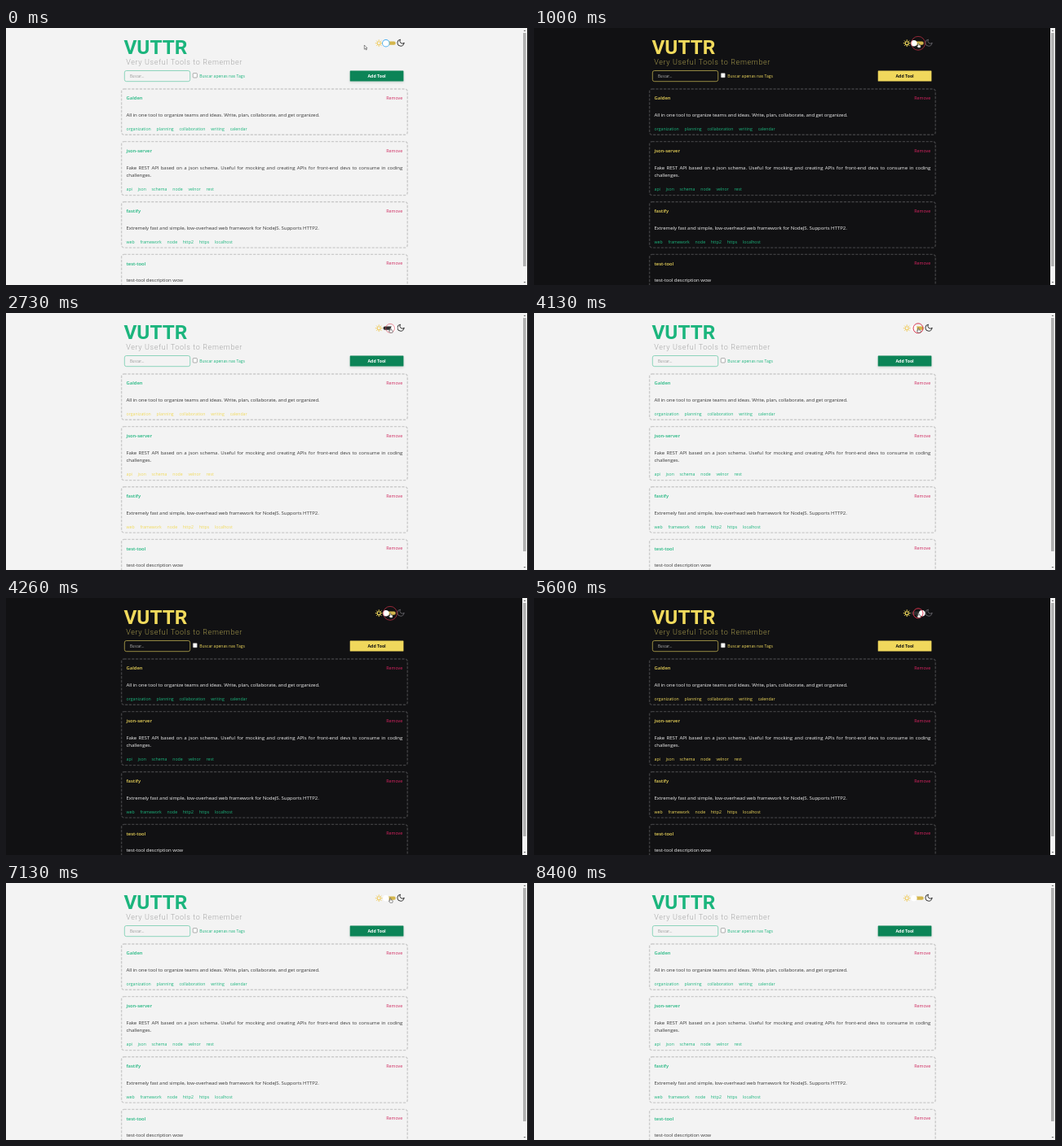
An HTML page with a canvas for the animation above (8530 ms loop, 640 by 316 pixels).

```html
<!DOCTYPE html>
<html lang="en">
<head>
<meta charset="utf-8">
<title>VUTTR</title>
<style>
html, body { margin: 0; width: 100%; height: 100%; overflow: hidden; background: #f3f3f3; }
canvas { display: block; width: 640px; height: 316px; }
</style>
</head>
<body>
<canvas id="stage"></canvas>
<script>
const LOOP = 8530;
const SANS = '"Open Sans", "Noto Sans", sans-serif';
const ROBOTO = 'Roboto, sans-serif';
const GREEN = [27, 181, 125], YELLOW = [241, 218, 92];
const TRACK_OFF = [212, 182, 76], TRACK_ON = [46, 46, 46];
const BODY = { size: 6.1, spacing: -0.09 };
const TAG = { size: 5.2, gap: 6.8 };

const THEMES = {
  light: {
    bg: '#f3f3f3', accent: '#1bb57d', sub: '#a6a6a6', text: '#3a3a3a', border: '#cbcbcb',
    remove: '#cf2a60', input: '#74cdae', hint: '#979797', button: '#0c8457',
    buttonText: '#fff', sun: '#f0cf6c', moon: '#222'
  },
  dark: {
    bg: '#111113', accent: '#f1da5c', sub: '#a3974b', text: '#f0f0f0', border: '#3e3e40',
    remove: '#dc2463', input: '#b8a94f', hint: '#b4b4b4', button: '#f0d85c',
    buttonText: '#111', sun: '#f1da5c', moon: '#66656a'
  }
};

const CARDS = [
  { y: 75, h: 56.3, name: 'Galden',
    lines: ['All in one tool to organize teams and ideas. Write, plan, collaborate, and get organized.'],
    tags: ['organization', 'planning', 'collaboration', 'writing', 'calendar'] },
  { y: 139.6, h: 66, name: 'json-server',
    lines: ['Fake REST API based on a json schema. Useful for mocking and creating APIs for front-end devs to consume in coding', 'challenges.'],
    tags: ['api', 'json', 'schema', 'node', 'velnor', 'rest'] },
  { y: 213.8, h: 56.3, name: 'fastify',
    lines: ['Extremely fast and simple, low-overhead web framework for NodeJS. Supports HTTP2.'],
    tags: ['web', 'framework', 'node', 'http2', 'https', 'localhost'] },
  { y: 278.4, h: 56.3, name: 'test-tool', lines: ['test-tool description wow'], tags: [] }
];

// Each click flips the theme on release; r and a shape the shrinking ring.
const CLICKS = [
  { press: 800, release: 1000, r: 8.5, a: 0.65 },
  { press: 2530, release: 2730, r: 5.5, a: 0.55 },
  { press: 4130, release: 4260, r: 8.5, a: 0.65 },
  { press: 5600, release: 5800, r: 9, a: 0.9 }
];

const canvas = document.getElementById('stage');
const ctx = canvas.getContext('2d');
const ratio = window.devicePixelRatio || 1;
canvas.width = 640 * ratio;
canvas.height = 316 * ratio;

const clamp = v => Math.max(0, Math.min(1, v));
const lerp = (a, b, k) => a + (b - a) * k;
const ease = k => k * k * (3 - 2 * k);
const mix = (a, b, k) => `rgb(${a.map((v, i) => Math.round(lerp(v, b[i], k)))})`;

// Small type is laid out ten times larger, then scaled, to keep fractional advances.
function setFont({ size, weight = 400, family = SANS, spacing = 0 }) {
  ctx.font = `${weight} ${size * 10}px ${family}`;
  ctx.letterSpacing = `${spacing * 10}px`;
}

function text(str, x, y, color, style) {
  ctx.save();
  ctx.translate(x, y);
  ctx.scale(0.1, 0.1);
  setFont(style);
  ctx.textAlign = style.align || 'left';
  ctx.fillStyle = color;
  ctx.fillText(str, 0, 0);
  ctx.restore();
}

function textWidth(str, style) {
  ctx.save();
  setFont(style);
  const w = ctx.measureText(str).width / 10;
  ctx.restore();
  return w;
}

function justified(str, x, y, width, color, style) {
  const words = str.split(' ');
  const widths = words.map(w => textWidth(w, style));
  const gap = (width - widths.reduce((a, b) => a + b, 0)) / (words.length - 1);
  words.forEach((w, i) => {
    text(w, x, y, color, style);
    x += widths[i] + gap;
  });
}

function box(x, y, w, h, r) {
  ctx.beginPath();
  ctx.roundRect(x, y, w, h, r);
}

function disc(x, y, r) {
  ctx.beginPath();
  ctx.arc(x, y, r, 0, Math.PI * 2);
}

function stroke(color, width) {
  ctx.strokeStyle = color;
  ctx.lineWidth = width;
  ctx.stroke();
}

function fill(color) {
  ctx.fillStyle = color;
  ctx.fill();
}

function drawHeader(c) {
  text('VUTTR', 144.4, 32.2, c.accent, { size: 24.4, weight: 700, family: ROBOTO });
  text('Very Useful Tools to Remember', 147.3, 44.6, c.sub,
    { size: 9, weight: 300, family: ROBOTO, spacing: 0.63 });

  box(145.3, 52.5, 80.4, 13.2, 2.4);
  stroke(c.input, 0.8);
  text('Buscar...', 152, 61, c.hint, { size: 4.4 });

  box(229.2, 55.6, 5.1, 5.4, 0.8);
  fill('#fff');
  stroke('#777', 0.6);
  text('Buscar apenas nas Tags', 237.2, 61.2, c.accent, { size: 5.05 });

  ctx.save();
  if (c === THEMES.light) {
    ctx.shadowColor = 'rgba(0,60,40,.16)';
    ctx.shadowBlur = 3;
    ctx.shadowOffsetY = 1.5;
  }
  box(421.7, 52.5, 65.7, 13, 0.6);
  fill(c.button);
  ctx.restore();
  text('Add Tool', 454.6, 61, c.buttonText, { size: 5.2, weight: 700, align: 'center' });
}

function drawCard(card, c, tagColor) {
  const { y, h, name, lines, tags } = card;
  ctx.save();
  ctx.setLineDash([3.2, 1.6]);
  box(141.6, y, 350.6, h, 3);
  stroke(c.border, 1.4);
  ctx.restore();

  text(name, 147.5, y + 13.1, c.accent, { size: 5.85, weight: 600 });
  text('Remove', 486.2, y + 13, c.remove, { size: 5.3, align: 'right' });
  lines.forEach((line, i) => {
    const base = y + 33.9 + i * 9.7;
    if (i < lines.length - 1) justified(line, 147.5, base, 338.7, c.text, BODY);
    else text(line, 147.5, base, c.text, BODY);
  });

  let x = 147.5;
  const tagY = y + 50.8 + (lines.length - 1) * 9.7;
  for (const tag of tags) {
    text(tag, x, tagY, tagColor, TAG);
    x += textWidth(tag, TAG) + TAG.gap;
  }
}

const moon = new Path2D('M21 12.8A9 9 0 1 1 11.2 3 7 7 0 0 0 21 12.8z');

function drawIcons(c) {
  ctx.save();
  ctx.lineCap = 'round';
  disc(457.2, 18.7, 2);
  stroke(c.sun, 1.1);
  ctx.beginPath();
  for (let i = 0; i < 8; i++) {
    const a = i * Math.PI / 4;
    ctx.moveTo(457.2 + 3 * Math.cos(a), 18.7 + 3 * Math.sin(a));
    ctx.lineTo(457.2 + 4 * Math.cos(a), 18.7 + 4 * Math.sin(a));
  }
  stroke(c.sun, 1);

  ctx.translate(478.5, 12.8);
  ctx.scale(0.45, 0.45);
  ctx.lineJoin = 'round';
  ctx.strokeStyle = c.moon;
  ctx.lineWidth = 2;
  ctx.stroke(moon);
  ctx.restore();
}

function drawToggle(on, focused) {
  box(462.5, 16.6, 15.2, 4.1, 2);
  fill(mix(TRACK_OFF, TRACK_ON, on));
  const x = lerp(465.8, 475.8, on);
  if (focused) {
    disc(x, 18.7, 4.7);
    fill('#4aaef0');
  }
  disc(x, 18.7, 3.8);
  fill('#fff');
}

function drawRing(t) {
  for (const { press, release, r, a } of CLICKS) {
    const k = (t - release) / 130;
    if (t < press || k >= 1) continue;
    const held = t < release;
    const radius = held ? (t < press + 65 ? 6 : 11.3) : r * (1 - k);
    ctx.save();
    ctx.globalAlpha = held ? 1 : a * (1 - k);
    disc(471, 18.8, radius);
    stroke('#d8344c', 1);
    ctx.restore();
  }
}

const arrow = new Path2D('M0 0V5.2L1.3 4.1 2.2 6 3 5.6 2.1 3.8H3.7Z');
const hand = new Path2D('M-.6 .2Q0 -.6 .6 .2V2.2L2.4 2.7Q3 2.9 2.9 3.6L2.5 5.6H-.5L-2 3.6Q-1.7 2.8-1.2 3.1L-.6 3.6Z');

function drawCursor(t) {
  if (t >= 8400) return;
  const k = ease(clamp((t - 30) / 500));
  const x = lerp(439.3, 471.3, k), y = lerp(21, 18.6, k);
  const shape = x > 461 ? hand : arrow;
  ctx.save();
  ctx.translate(x, y);
  ctx.lineJoin = 'round';
  ctx.strokeStyle = '#222';
  ctx.lineWidth = 0.5;
  ctx.fillStyle = '#fff';
  ctx.fill(shape);
  ctx.stroke(shape);
  ctx.restore();
}

function triangle(x, y, dy) {
  ctx.beginPath();
  ctx.moveTo(x - 1.4, y);
  ctx.lineTo(x + 1.4, y);
  ctx.lineTo(x, y + dy);
  fill('#606060');
}

function drawScrollbar() {
  const column = (x, y, w, h, color) => {
    ctx.fillStyle = color;
    ctx.fillRect(x, y, w, h);
  };
  column(633, 0, 6, 316, '#f4f4f4');
  column(634, 6, 3.6, 287, '#b0b0b0');
  column(639, 0, 1, 316, '#111');
  triangle(635.9, 4, -1.6);
  triangle(635.9, 312, 1.6);
}

function draw(t) {
  const flips = CLICKS.filter(c => t >= c.release);
  const dark = flips.length % 2 === 1;
  const since = flips.length ? t - flips[flips.length - 1].release : LOOP;
  const toward = span => {
    const k = ease(clamp(since / span));
    return dark ? k : 1 - k;
  };
  const c = dark ? THEMES.dark : THEMES.light;

  ctx.setTransform(ratio, 0, 0, ratio, 0, 0);
  ctx.fillStyle = c.bg;
  ctx.fillRect(0, 0, 640, 316);
  drawHeader(c);
  const tagColor = mix(GREEN, YELLOW, toward(500));
  CARDS.forEach(card => drawCard(card, c, tagColor));
  drawIcons(c);
  drawToggle(toward(250), t < 800);
  drawRing(t);
  drawCursor(t);
  drawScrollbar();
}

const start = performance.now();
function tick() {
  draw((performance.now() - start) % LOOP);
  requestAnimationFrame(tick);
}
tick();
</script>
</body>
</html>
```
